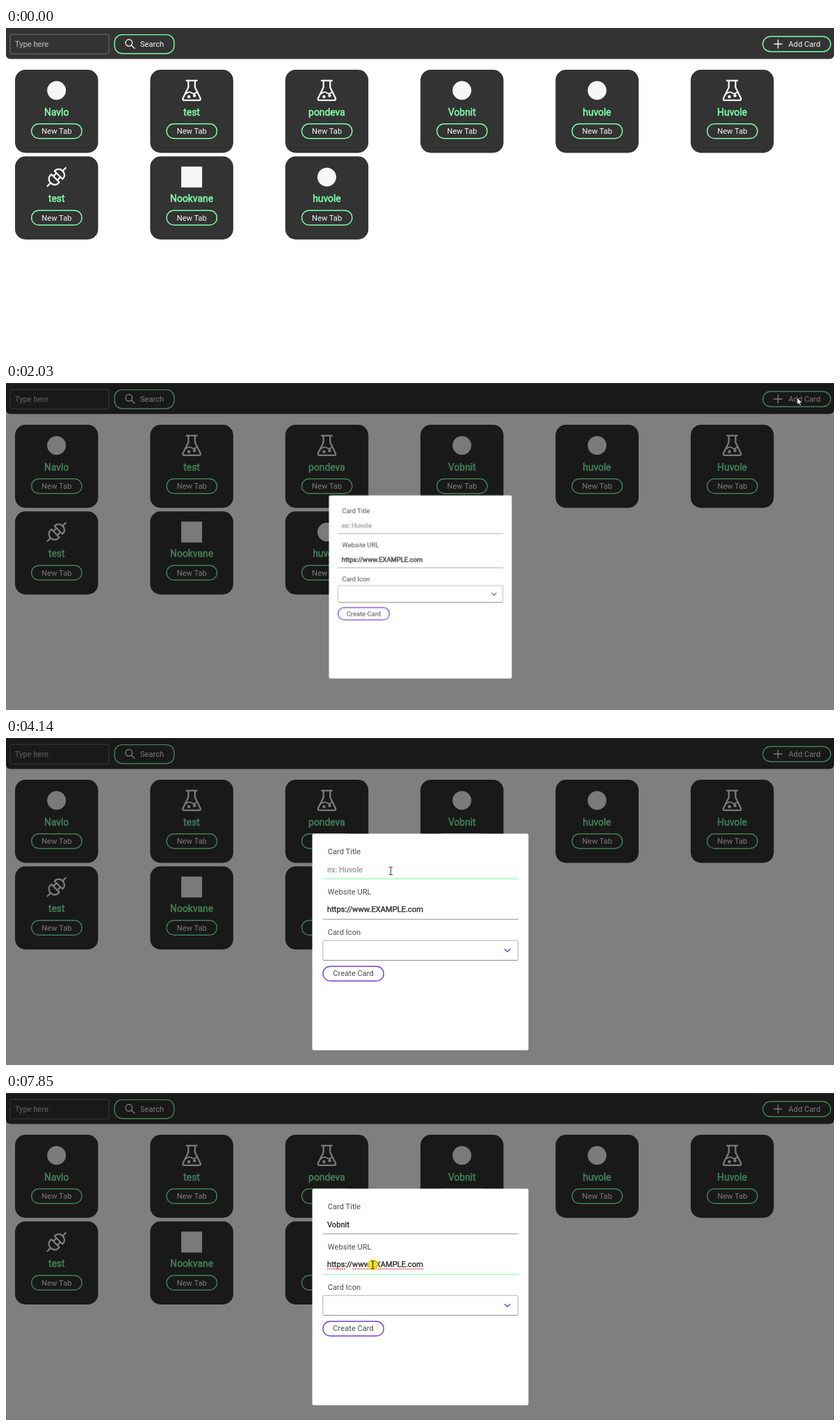
An HTML page that plays this animation: 1191 by 470 pixels, repeating every 8000 ms.

```html
<!DOCTYPE html>
<html lang="en">
<head>
<meta charset="utf-8">
<title>Card board</title>
<style>
  html, body { margin: 0; width: 1191px; height: 470px; overflow: hidden; background: #fff; }
  svg { display: block; font: 11.15px Roboto, Arial, sans-serif; }
  .dark { fill: #333; }
  .pill { fill: none; stroke: #80ffaa; stroke-width: 1.4; }
  .label { fill: #f6f6f6; }
  .mid { text-anchor: middle; }
  .bold { fill: currentColor; stroke: currentColor; stroke-width: .42; }
  .title { color: #80ffaa; font-size: 13.9px; stroke-width: .5; }
  .hint { color: #a3a3a3; }
  .value { color: #363636; }
  .icon { fill: none; stroke: #f6f6f6; stroke-width: 2.3; stroke-linejoin: round; stroke-linecap: round; }
  .thin { stroke-width: 1.4; }
  .solid { fill: #f6f6f6; stroke: none; }
  .field { fill: #4d4d4d; }
  .line { stroke: #9c9c9c; }
  .accent { fill: none; stroke: #7240d6; stroke-width: 1.4; }
  .squiggle { stroke: #e8313c; stroke-width: 1.3; stroke-dasharray: 2 1; }
  .caret { fill: #222; }

  /* One 8 s timeline, all hard changes */
  .shade, .modal, .glow, .line, .caret, .squiggle, .click { animation: 8s step-end infinite; }
  .shade { animation-name: shade; }
  .modal { animation-name: modal; transform-origin: 596px 293px; }
  .glow { animation-name: glow; stroke-width: 2.4; }
  .line-title { animation-name: line-title; }
  .line-url { animation-name: line-url; }
  .caret-title { animation-name: caret-title; }
  .caret-url { animation-name: caret-url; }
  .squiggle { animation-name: squiggle; }
  .click { animation-name: click; fill: #f2e200; }
  @keyframes shade { 0% { opacity: 0 } 25.375%, 100% { opacity: .5 } }
  @keyframes modal {
    0% { opacity: 0; transform: scale(.8456) }
    25.375% { opacity: 1; transform: scale(.8456) }
    26.25% { opacity: 1; transform: scale(.965) }
    27.25%, 100% { opacity: 1; transform: none }
  }
  @keyframes glow { 0%, 25.375%, 100% { opacity: 0 } 17.5% { opacity: 1 } }
  @keyframes line-title { 0%, 89.425%, 100% { stroke: #9c9c9c } 44.875% { stroke: #80ffaa } }
  @keyframes line-url { 0% { stroke: #9c9c9c } 89.425%, 100% { stroke: #80ffaa } }
  @keyframes caret-title { 0%, 51.75%, 83.75%, 100% { opacity: 0 } 44.875%, 58.5% { opacity: 1 } }
  @keyframes caret-url { 0%, 96.375%, 100% { opacity: 0 } 89.425% { opacity: 1 } }
  @keyframes squiggle { 0% { opacity: 0 } 89.425%, 100% { opacity: 1 } }
  @keyframes click {
    0%, 24.375%, 45.875%, 90.375% { opacity: 0 }
    23.25%, 44.875%, 89.425%, 98.125%, 100% { opacity: .75 }
  }
</style>
</head>
<body>
<svg width="1191" height="470" viewBox="0 0 1191 470">
  <defs>
    <g id="flask" class="icon">
      <path d="M-7.5-14H7.5M-4.8-14V-4.5L-12.4 11Q-13.6 14.2-10.4 14.2H10.4Q13.6 14.2 12.4 11L4.8-4.5V-14"/>
      <path d="M-8 4.5Q-4 1 0 3.5T7.5 2.5" stroke-width="1.8"/>
      <circle class="solid" cx="-4" cy="9" r="2.2"/>
      <circle class="solid" cx="4" cy="7.5" r="2.2"/>
    </g>
    <g id="plug" class="icon" transform="rotate(-45)">
      <path d="M-18.5 0H-12M12 0H18.5M-2.5-8V8H-5A7 8 0 0 1-5-8ZM4-8V8H5.5A7 8 0 0 0 5.5-8ZM-2.5-4H3M-2.5 4H3"/>
    </g>
    <circle id="disc" class="solid" r="13.5"/>
    <rect id="square" class="solid" x="-15" y="-15" width="30" height="30"/>
  </defs>

  <rect class="dark" x="0" y="-10" width="1191" height="54.5" rx="6"/>
  <rect x="6" y="9.2" width="142" height="28" rx="2" fill="none" stroke="#707070"/>
  <text class="bold hint" x="13" y="27">Type here</text>
  <rect class="pill" x="156.2" y="9.6" width="85.6" height="27.2" rx="11"/>
  <path class="icon thin" d="M180.2 24.7L185 29.3M181.6 21.3a4.8 4.8 0 1 0-9.6 0a4.8 4.8 0 1 0 9.6 0"/>
  <text class="label" x="193" y="27">Search</text>
  <rect class="pill" x="1088.6" y="12.2" width="97.6" height="21.8" rx="10.9"/>
  <rect class="pill glow" x="1088.1" y="11.7" width="98.6" height="22.8" rx="11.4"/>
  <path class="icon thin" d="M1104.7 23H1116.3M1110.5 17.2V28.8"/>
  <text class="label" x="1125.6" y="27">Add Card</text>

  <g id="cards"></g>

  <rect class="shade" width="1191" height="470"/>
  <rect width="1191" height="1" fill="#2e2e2e"/>

  <g class="modal">
    <rect x="440.5" y="137.5" width="311" height="311.3" rx="2.5" fill="#fff"/>
    <text class="field" x="462.8" y="167.4">Card Title</text>
    <text class="bold hint" id="hint" x="462" y="192.5">ex: Huvole</text>
    <text class="bold value" id="typed" x="462" y="192.5"></text>
    <rect class="caret caret-title" id="caret" x="462" y="182" width="1" height="14"/>
    <path class="line line-title" d="M455.5 202.5H737"/>
    <text class="field" x="462.8" y="225.4">Website URL</text>
    <text class="bold value" x="462" y="250.4">https://www.EXAMPLE.com</text>
    <path class="squiggle" d="M462 252.8H488M498.5 252.8H601"/>
    <rect class="caret caret-url" x="540" y="240" width="1" height="14"/>
    <path class="line line-url" d="M455.5 260.5H737"/>
    <text class="field" x="462.8" y="283.4">Card Icon</text>
    <rect x="455.8" y="291" width="280.7" height="28.5" rx="2" fill="none" stroke="#b0b0b0"/>
    <path d="M457 319.5H735.5" stroke="#8c8c8c"/>
    <path class="accent" d="M717.2 303.2L721.3 307.2L725.4 303.2"/>
    <rect class="accent" x="455.9" y="328.2" width="87.4" height="21" rx="10.5"/>
    <text class="field mid" x="499.6" y="342.4">Create Card</text>
  </g>

  <g id="cursor">
    <circle class="click" r="8"/>
    <path id="arrow" d="M0 0V10.2L2.4 8L4 11.6L5.7 10.9L4.1 7.4H7.2Z" fill="#fff" stroke="#222" stroke-width=".9"/>
    <path id="beam" d="M-2.5-5.5H-.8L0-5L.8-5.5H2.5M0-5V5M-2.5 5.5H-.8L0 5L.8 5.5H2.5" fill="none" stroke="#222"/>
  </g>
</svg>
<script>
  const LOOP = 8000;
  const $ = id => document.getElementById(id);

  const cards = [
    ['Navlo', 'disc'], ['test', 'flask'], ['pondeva', 'flask'],
    ['Vobnit', 'disc'], ['huvole', 'disc'], ['Huvole', 'flask'],
    ['test', 'plug'], ['Nookvane', 'square'], ['huvole', 'disc']
  ];
  $('cards').innerHTML = cards.map(([name, icon], i) => {
    const x = 13 + (i % 6) * 194.37, y = 60 + Math.floor(i / 6) * 124.5;
    return `<g transform="translate(${x} ${y})">
      <rect class="dark" width="119.5" height="119.5" rx="15"/>
      <use href="#${icon}" x="59.7" y="29.7"/>
      <text class="bold title mid" x="59.7" y="65.6">${name}</text>
      <rect class="pill" x="23.7" y="77.7" width="72.4" height="21" rx="10.5"/>
      <text class="label mid" x="59.9" y="92">New Tab</text>
    </g>`;
  }).join('');

  const word = 'Vobnit';
  const keyTimes = [5140, 5450, 5690, 5840, 6010, 6160];

  // The pointer is refreshed in n jumps per move, slowing towards its end
  const moves = [
    { start: 520, end: 1400, n: 12, to: [1138, 21] },
    { start: 2420, end: 3110, n: 10, to: [553.5, 191] },
    { start: 6776, end: 7154, n: 6, to: [541, 246.5] },
    { start: 7390, end: 7710, n: 5, to: [527.5, 247] }
  ];

  function pointerAt(t) {
    let pos = [1168, 475];
    for (const { start, end, n, to } of moves) {
      if (t < start) break;
      const jump = Math.floor((t - start) / (end - start) * (n - 1) + 1.2);
      const p = 1 - (1 - Math.min(1, jump / n)) ** 2.15;
      pos = pos.map((v, i) => v + (to[i] - v) * p);
    }
    return pos;
  }

  function draw(t) {
    const [x, y] = pointerAt(t);
    const overField = t > 2500 && ((y > 181 && y < 203) || y > 235);
    $('cursor').setAttribute('transform', `translate(${x} ${y})`);
    $('arrow').style.opacity = overField ? 0 : 1;
    $('beam').style.opacity = overField ? 1 : 0;

    const count = keyTimes.filter(k => t >= k).length;
    $('typed').textContent = word.slice(0, count);
    $('hint').style.opacity = count ? 0 : 1;
    $('caret').setAttribute('x', Math.round(462 + (count ? $('typed').getComputedTextLength() : 0)));
  }

  let origin;
  function tick(now) {
    origin ??= now;
    draw((now - origin) % LOOP);
    requestAnimationFrame(tick);
  }
  draw(0);
  requestAnimationFrame(tick);
</script>
</body>
</html>
```
